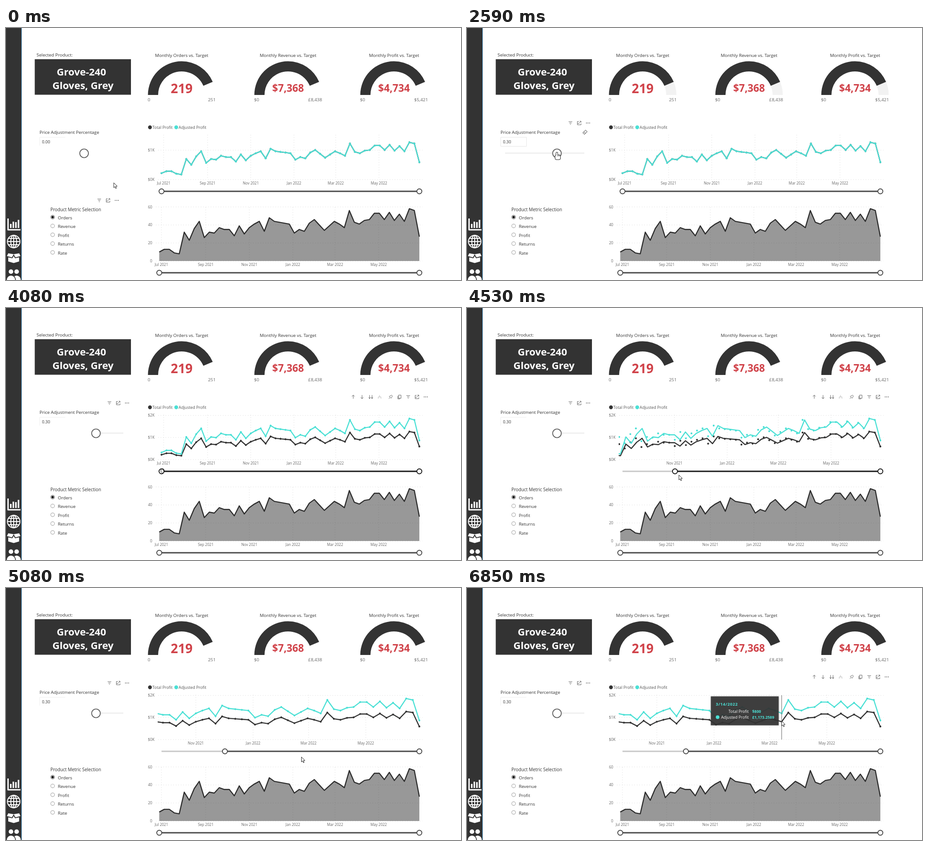
These frames come from a looping animation (1005 px wide and 557 px high, 8 s). An HTML page with a canvas:

```html
<!DOCTYPE html>
<html lang="en">
<head>
<meta charset="utf-8">
<title>Product dashboard</title>
<style>
html, body { margin: 0; width: 100%; height: 100%; overflow: hidden; background: #fff; }
canvas { display: block; width: 1005px; height: 557px; }
</style>
</head>
<body>
<canvas id="stage"></canvas>
<script>
const W = 1005, H = 557, LOOP = 8000;
const DARK = '#333', GREY = '#666', TEAL = '#4be0d5', RED = '#d04249';
const FONT = '"Open Sans", "Noto Sans", sans-serif';
const canvas = document.getElementById('stage');
const ctx = canvas.getContext('2d');
const dpr = window.devicePixelRatio || 1;
canvas.width = W * dpr;
canvas.height = H * dpr;

// Weekly orders: the one data set; profit and adjusted profit are derived from it
const orders = [10, 13, 13, 9, 8, 32, 23, 36, 44, 26, 32, 31, 37, 35, 35, 28, 39, 30, 37, 41, 44, 33,
  48, 44, 43, 42, 41, 31, 35, 33, 42, 46, 40, 34, 39, 44, 41, 37, 56, 43, 41, 45, 46, 53, 53, 46, 54,
  45, 52, 44, 58, 56, 27];
const LAST = orders.length - 1, UNIT_PROFIT = 21.85;
const LEFT = 343.5, RIGHT = 913;
const WEEK = 7 * 864e5, FIRST_DAY = Date.UTC(2021, 5, 28);
const months = ['Jul 2021', 'Sep 2021', 'Nov 2021', 'Jan 2022', 'Mar 2022', 'May 2022'].map(label =>
  ({ label, week: (Date.parse(`1 ${label} UTC`) - FIRST_DAY) / WEEK }));

const between = (t, a, b) => t >= a && t < b;
const ramp = (t, a, b) => Math.min(1, Math.max(0, (t - a) / (b - a)));
const ease = (t, a, b) => Math.sin(ramp(t, a, b) * Math.PI / 2);

// Pointer moves: start, end, destination
const moves = [[560, 1300, 180, 276], [1560, 2300, 198.5, 275], [3390, 4080, 345, 355],
  [4230, 4530, 468, 369], [4600, 5500, 716, 375], [5650, 6370, 695, 294]];

function pointer(t) {
  return moves.reduce(([x, y], [a, b, toX, toY]) => {
    const p = ease(t, a, b);
    return [x + (toX - x) * p, y + (toY - y) * p];
  }, [238, 342]);
}

const rangeStart = t => LEFT + 140 * ramp(t, 4200, 4600);

// Pixels per week once the plot is stretched to the selected range
function weekGap(t) {
  const shown = (RIGHT - rangeStart(t)) / (RIGHT - LEFT);
  return (RIGHT - LEFT) / (LAST * shown);
}

function text(s, x, y, size, color = DARK, align = 'left', weight = 400) {
  ctx.font = `${weight} ${size}px ${FONT}`;
  ctx.textAlign = align;
  ctx.fillStyle = color;
  ctx.fillText(s, x, y);
}

function rect(x, y, w, h, color) {
  ctx.fillStyle = color;
  ctx.fillRect(x, y, w, h);
}

function frameRect(x, y, w, h, color) {
  ctx.strokeStyle = color;
  ctx.lineWidth = 1;
  ctx.strokeRect(x, y, w, h);
}

function trace(points) {
  ctx.beginPath();
  points.forEach(([x, y]) => ctx.lineTo(x, y));
}

function line(points, color = GREY, width = 1) {
  trace(points);
  ctx.strokeStyle = color;
  ctx.lineWidth = width;
  ctx.stroke();
}

function poly(points, color) {
  trace(points);
  ctx.closePath();
  ctx.fillStyle = color;
  ctx.fill();
}

function oval(x, y, rx, ry) {
  ctx.beginPath();
  ctx.ellipse(x, y, rx, ry, 0, 0, Math.PI * 2);
}

function dot(x, y, r, color) {
  oval(x, y, r, r);
  ctx.fillStyle = color;
  ctx.fill();
}

function ring(x, y, r, color, width, fill = '#fff') {
  dot(x, y, r, fill);
  ctx.strokeStyle = color;
  ctx.lineWidth = width;
  ctx.stroke();
}

function grid(x1, y1, x2, y2) {
  ctx.setLineDash([1.5, 4]);
  line([[x1, y1], [x2, y2]], '#dcdcdc');
  ctx.setLineDash([]);
}

function at(x, y, paint, flip = 1) {
  ctx.save();
  ctx.translate(x, y);
  ctx.scale(flip, 1);
  paint();
  ctx.restore();
}

function sidebar() {
  const w = '#fff';
  rect(0, 0, 34, H, DARK);
  rect(34, 0, 1, H, '#5aa9dc');

  line([[4.5, 421], [4.5, 446], [32, 446]], w, 3);
  for (let i = 0; i < 4; i++) {
    const x = 10.5 + i * 5.7;
    line([[x, 433 - i * 2 - (i % 2) * 3], [x, 442]], w, 3.4);
  }

  at(17, 472, () => {
    ring(0, 0, 13.8, w, 2, DARK);
    oval(0, 0, 6.5, 13.8);
    ctx.stroke();
    line([[0, -14], [0, 14]], w, 2);
    for (let y = -7; y <= 7; y += 7) {
      const half = Math.sqrt(190 - y * y);
      line([[-half, y], [half, y]], w, 2);
    }
  });

  for (const side of [-1, 1]) {
    at(17, 498, () => {
      poly([[12, 0], [0, 2], [4, 9], [15, 6]], w);
      poly([[0, 6], [3, 11], [12, 9], [12, 18], [0, 21.5]], w);
    }, side);
  }

  for (const x of [23.5, 11]) {
    ring(x, 538.5, 5.8, DARK, 1.5, w);
    oval(x, 557, 10, 10.5);
    ctx.fill();
    ctx.stroke();
  }
}

function gauge(cx, name, value, max, unit, maxUnit, size, base, full) {
  text(`Monthly ${name} vs. Target`, cx, 63.5, 9.8, DARK, 'center');
  const end = Math.PI * (1 + value / max);
  const arc = (from, to, color) => {
    ctx.beginPath();
    ctx.arc(cx, 148, 74.5, from, to);
    ctx.arc(cx, 148, 52, to, from, true);
    ctx.fillStyle = color;
    ctx.fill();
  };
  if (full) arc(end, Math.PI * 2, '#f2f2f2');
  arc(Math.PI, end, DARK);
  text(unit + value.toLocaleString('en-US'), cx, base, size, RED, 'center', 700);
  text(unit + 0, cx - 75, 162, 9.8, GREY);
  text(maxUnit + max.toLocaleString('en-US'), cx + 75, 162, 9.8, GREY, 'right');
}

function arrow(x, dir, head = 3) {
  line([[x, -4 * dir], [x, 4 * dir]]);
  line([[x - head, dir], [x, 4 * dir], [x + head, dir]]);
}

const icons = {
  up() { arrow(0, -1); },
  down() { arrow(0, 1); },
  double() { arrow(-2.7, 1, 2); arrow(2.7, 1, 2); },
  fork() { line([[0, -4], [0, 0], [-3, 0], [-3, 4]], '#bbb'); line([[0, 0], [3, 0], [3, 4]], '#bbb'); },
  pin() { line([[-4, 4], [-1, 1], [-3, -1], [2, -4], [4, -2], [1, 3], [-1, 1]]); },
  copy() { frameRect(-2, -4, 5.5, 7, GREY); line([[-3.5, -2], [-3.5, 4.5], [1.5, 4.5]]); },
  filter() { for (let i = 0; i < 3; i++) line([[1.5 * i - 4, 3 * i - 3], [4 - 1.5 * i, 3 * i - 3]]); },
  focus() {
    line([[-1, -3.5], [-4, -3.5], [-4, 4], [4, 4], [4, 1]]);
    line([[1, -4], [4, -4], [4, -1]]);
    line([[4, -4], [-1, 1], [-4, 1]]);
  },
  more() { for (let x = -3.5; x <= 3.5; x += 3.5) dot(x, 0, 0.9, '#555'); },
  eraser() {
    at(0, 0, () => {
      ctx.rotate(-Math.PI / 4);
      frameRect(-4, -2.5, 8.5, 5, GREY);
      line([[-1, -2.5], [-1, 2.5]]);
    });
  }
};

const headerIcons = ['filter', 'focus', 'more'];
const chartIcons = ['up', 'down', 'double', 'fork', 'pin', 'copy', ...headerIcons];

function iconRow(names, x, y) {
  names.forEach((name, i) => at(x + i * 19.4 + (i > 3 ? 5 : 0), y, icons[name]));
}

function rangeBar(from, start, y, color) {
  line([[from, y], [start, y]], '#c8c8c8', 3);
  line([[start, y], [RIGHT, y]], color, 3.2);
  for (const x of [start, RIGHT]) ring(x, y, 5.5, color, 1.9);
}

function productCard() {
  text('Selected Product:', 67.5, 62.5, 9.85);
  rect(63.5, 69, 212.5, 78.5, DARK);
  text('Grove-240', 166.5, 105, 22, '#fff', 'center', 700);
  text('Gloves, Grey', 170, 135, 22, '#fff', 'center', 700);
}

function priceSlider(t) {
  const dragging = between(t, 1530, 2710);
  const value = 0.3 * ease(t, 1560, 2300);
  text('Price Adjustment Percentage', 74, 233.5, 9.8);
  if (dragging) frameRect(74.5, 241.5, 57, 20, '#e6e6e6');
  else line([[74.5, 260], [74.5, 241.5], [131, 241.5]], '#eee');
  text(value.toFixed(2), 79.5, 254.8, 9);

  const bar = from => line([[from, 276.5], [259, 276.5]], '#e2e2e2', 1.4);
  if (dragging) bar(84);
  else if (t >= 1220) bar(t < 1530 ? 203 : 209);
  ring(172.5 + 87.5 * value, 277, 9.6, between(t, 1220, 1680) ? '#888' : '#606060', 1.9);
  if (t >= 1050) iconRow(headerIcons, 228.5, 210);
  if (between(t, 1050, 3660)) at(260.5, 230.5, icons.eraser);
}

function metricList(t) {
  if (t < 2440) iconRow(headerIcons, 206, 381);
  text('Product Metric Selection', 98, 404.5, 9.9);
  ['Orders', 'Revenue', 'Profit', 'Returns', 'Rate'].forEach((s, i) => {
    const y = 418 + i * 19.5;
    ring(103, y, 4.1, i ? '#999' : '#555', 1);
    if (!i) dot(103, y, 2.7, '#111');
    text(s, 114.5, y + 4.5, 9.8);
  });
}

function legend(x, s, color) {
  dot(x, 219.5, 4.2, color);
  text(s, x + 5.3, 223, 8.85, '#555');
}

function monthAxis(weekToX, top, bottom, base) {
  for (const { label, week } of months) {
    const x = weekToX(week);
    if (x < 342) continue;
    grid(x, top, x, bottom);
    text(label, x, base, 8.05, GREY, 'center');
  }
}

function profitChart(t) {
  const split = ramp(t, 2650, 2830) * (t >= 2710);
  const perK = 65 - 16.2 * split;
  const topTick = t < 2710 ? 1 : 2;
  const weekToX = gap => week => RIGHT - (LAST - week) * gap;

  legend(318, 'Total Profit', DARK);
  legend(376, 'Adjusted Profit', TEAL);
  for (let k = 0; k <= topTick; k++) {
    const y = 335 - k * (topTick === 1 ? 65 : 48.8);
    grid(336, y, 920, y);
    text(`$${k}K`, 328, y + 3, 8.3, GREY, 'right');
  }
  monthAxis(weekToX(weekGap(t - 36)), 236, 335, 345.7);

  ctx.save();
  ctx.beginPath();
  ctx.rect(335, 230, 590, 110);
  ctx.clip();
  // While the range is dragged, markers trail the axis and lines trail the markers
  const dotX = weekToX(weekGap(t - 156)), lineX = weekToX(weekGap(t - 194));
  for (const [color, factor] of [[DARK, 1], [TEAL, 1 + 0.466 * split]]) {
    const ys = orders.map(n => 335 - n * UNIT_PROFIT * factor * perK / 1000);
    line(ys.map((y, i) => [lineX(i), y]), color, 2.4);
    ys.forEach((y, i) => dot(dotX(i), y, 2.1, color));
  }
  ctx.restore();

  rangeBar(LEFT, rangeStart(t), 361, between(t, 4080, 4800) ? '#1a1a1a' : '#4a4a4a');
  if (between(t, 3940, 4800) || t >= 5650) iconRow(chartIcons, 767, 196.5);
  if (t >= 6370) line([[695, 237], [695, 335]], '#777', 1.2);
}

function ordersChart() {
  const left = 338.5, base = 515, scale = 119.5 / 60;
  const weekToX = week => left + week * (RIGHT - left) / LAST;
  for (let n = 0; n <= 60; n += 20) {
    const y = base - n * scale;
    grid(331, y, 920, y);
    text(n, 323, y + 3, 8.2, GREY, 'right');
  }
  monthAxis(weekToX, 396, base, 526);
  const points = orders.map((n, i) => [weekToX(i), base - n * scale]);
  poly([[left, base], ...points, [RIGHT, base]], 'rgba(51,51,51,.5)');
  line(points, '#2d2d2d', 2.4);
  rangeBar(left, left, 541, '#4a4a4a');
}

function tooltip() {
  ctx.save();
  ctx.shadowColor = 'rgba(0,0,0,.25)';
  ctx.shadowBlur = 5;
  rect(538.5, 239.5, 150, 64, 'rgba(51,51,51,.92)');
  ctx.restore();
  ctx.letterSpacing = '0.6px';
  text('3/14/2022', 549.5, 260, 9, TEAL, 'left', 700);
  ctx.letterSpacing = '0px';
  dot(553.5, 285.5, 4, TEAL);
  text('Total Profit', 622, 275.5, 8.8, '#fff', 'right');
  text('Adjusted Profit', 622, 289, 8.8, '#fff', 'right');
  text('$800', 630, 275.5, 8.5, TEAL, 'left', 700);
  text('£1,173.2589', 630, 289, 8.5, TEAL, 'left', 700);
}

function hand() {
  ctx.beginPath();
  ctx.roundRect(-1.5, 0, 3, 11, 1.5);
  ctx.roundRect(-3.5, 6, 11, 9.5, 3);
  ctx.lineWidth = 2;
  ctx.stroke();
  ctx.fill();
  for (let x = 1.5; x < 6; x += 2.2) line([[x, 6], [x, 9]], '#444', 0.7);
}

function arrowCursor() {
  trace([[0, 0], [0, 11], [2.5, 8.7], [4.2, 12.7], [6, 12], [4.3, 8], [7.7, 7.8]]);
  ctx.closePath();
  ctx.fill();
  ctx.lineWidth = 1;
  ctx.stroke();
}

function cursor(t) {
  const [x, y] = pointer(t);
  ctx.strokeStyle = '#222';
  ctx.fillStyle = '#fff';
  if (between(t, 4080, 4230)) {
    ctx.lineWidth = 1;
    oval(346, 360, 3.8, 5);
    ctx.stroke();
  } else {
    at(x, y, between(t, 1220, 3530) ? hand : arrowCursor);
  }
}

function draw(t) {
  const redraw = between(t, 2440, 2710);
  ctx.setTransform(dpr, 0, 0, dpr, 0, 0);
  ctx.lineJoin = 'round';
  rect(0, 0, W, H, '#fff');
  sidebar();
  productCard();
  gauge(388, 'Orders', 219, 251, '', '', 28.2, 144, redraw);
  gauge(623, 'Revenue', 7368, 8438, '$', '£', 22.3, 141, redraw);
  gauge(857, 'Profit', 4734, 5421, '$', '$', 22.3, 141, redraw);
  priceSlider(t);
  metricList(t);
  profitChart(t);
  ordersChart();
  if (t >= 6850) tooltip();
  cursor(t);
}

const start = performance.now();
function frame() {
  draw((performance.now() - start) % LOOP);
  requestAnimationFrame(frame);
}
frame();
</script>
</body>
</html>
```
